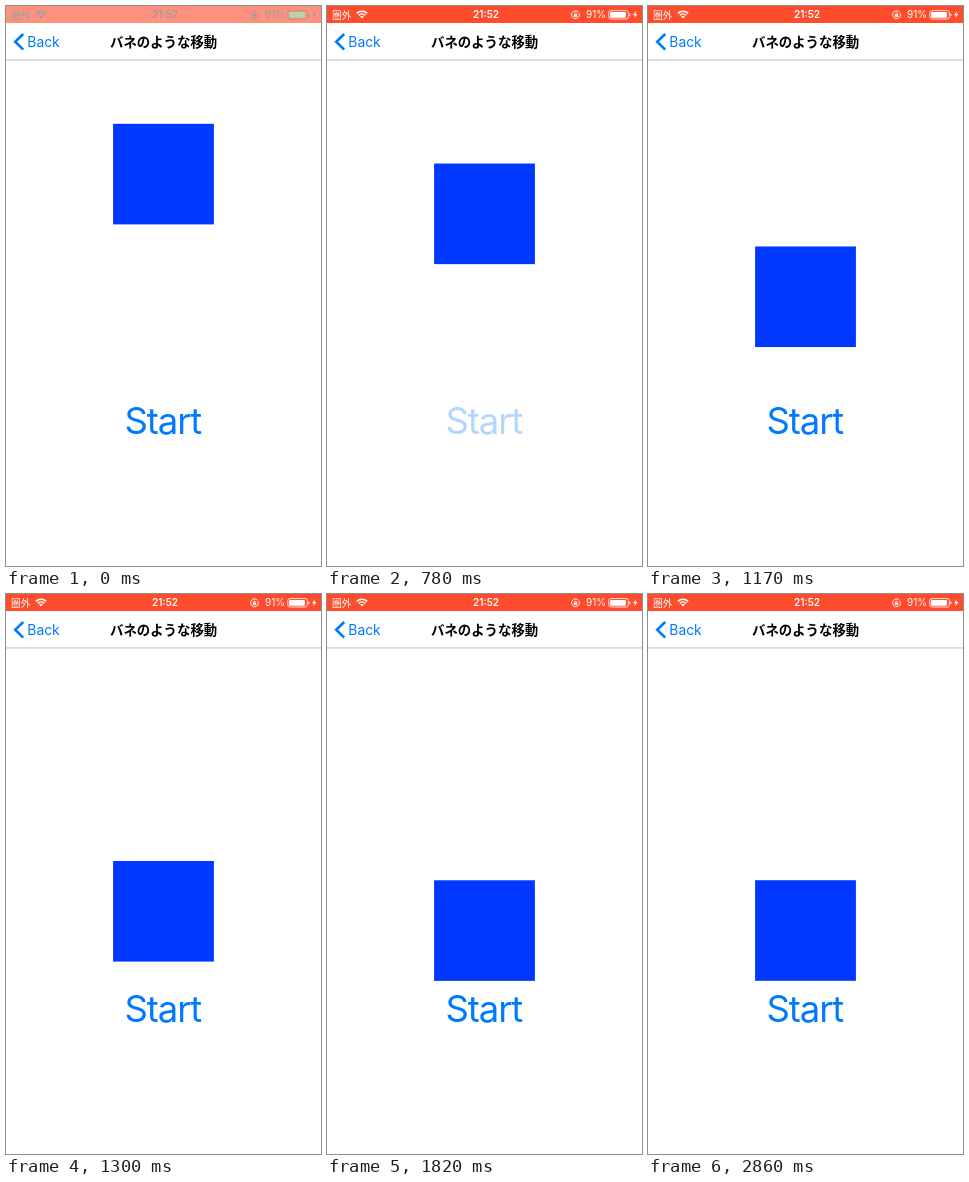
Write an HTML page with a canvas that moves like this. It is 315 px wide and 560 px high and loops after 3.51 s.

```html
<!DOCTYPE html>
<html lang="ja">
<head>
<meta charset="utf-8">
<title>Spring</title>
<style>
html, body { margin: 0; width: 100%; height: 100%; overflow: hidden; background: #fff; }
canvas { display: block; width: 315px; height: 560px; }
</style>
</head>
<body>
<canvas id="stage" width="315" height="560"></canvas>
<script>
const ctx = document.getElementById('stage').getContext('2d');
const LOOP = 3510, STEP = 130, LAST_STEP = 2860;
const LATIN = 'Inter, Roboto, sans-serif';
const CJK = '"Noto Sans CJK JP", "Noto Sans CJK", sans-serif';
const TINT = '#007aff';

const clamp = v => Math.max(0, Math.min(1, v));
const mix = (a, b, k) => 'rgb(' + a.map((v, i) => Math.round(v + (b[i] - v) * k)) + ')';

function text(str, x, y, font, color, align = 'left', spacing = 0) {
  ctx.font = font;
  ctx.letterSpacing = spacing + 'px';
  ctx.fillStyle = color;
  ctx.textAlign = align;
  ctx.fillText(str, x, y);
}

function polyline(points, color, width) {
  ctx.beginPath();
  points.forEach(([x, y]) => ctx.lineTo(x, y));
  ctx.strokeStyle = color;
  ctx.lineWidth = width;
  ctx.stroke();
}

function wifi(x, y, color) {
  const from = -Math.PI * 0.75, to = -Math.PI * 0.25;
  ctx.strokeStyle = ctx.fillStyle = color;
  ctx.lineWidth = 1.6;
  for (const r of [4.6, 7.3]) {
    ctx.beginPath();
    ctx.arc(x, y, r, from, to);
    ctx.stroke();
  }
  ctx.beginPath();
  ctx.moveTo(x, y);
  ctx.arc(x, y, 2.8, from, to);
  ctx.fill();
}

function rotationLock(x, y, color) {
  ctx.strokeStyle = ctx.fillStyle = color;
  ctx.lineWidth = 0.9;
  ctx.beginPath();
  ctx.arc(x, y, 3.9, -0.5, Math.PI * 1.75);
  ctx.stroke();
  ctx.fillRect(x - 1.7, y - 0.4, 3.4, 2.5);
  ctx.beginPath();
  ctx.arc(x, y - 0.5, 1.1, Math.PI, 0);
  ctx.stroke();
}

function battery(x, y, color, fill) {
  ctx.strokeStyle = color;
  ctx.lineWidth = 0.8;
  ctx.beginPath();
  ctx.roundRect(x, y, 19.5, 8.4, 2);
  ctx.stroke();
  ctx.fillStyle = fill;
  ctx.beginPath();
  ctx.roundRect(x + 1.3, y + 1.3, 15.8, 5.8, 0.9);
  ctx.fill();
  ctx.fillStyle = color;
  ctx.fillRect(x + 20.5, y + 2.9, 1, 2.7);
}

function bolt(x, y, color) {
  ctx.fillStyle = color;
  ctx.beginPath();
  [[3, 0], [0, 4.2], [2, 4.2], [1.2, 7.5], [4.4, 3.1], [2.4, 3.1]]
    .forEach(([dx, dy]) => ctx.lineTo(x + dx, y + dy));
  ctx.fill();
}

function statusBar(shown) {
  const ink = mix([0, 0, 0], [255, 255, 255], shown);
  ctx.fillStyle = mix([255, 255, 255], [255, 76, 44], shown);
  ctx.fillRect(0, 0, 315, 17);
  text('圏外', 5, 12.6, '9.7px ' + CJK, ink);
  wifi(35, 12.6, ink);
  text('21:52', 159, 12.4, '600 10px ' + LATIN, ink, 'center');
  rotationLock(248.5, 8.8, ink);
  text('91%', 259, 12.4, '10px ' + LATIN, ink);
  battery(281.8, 4.6, ink, mix([80, 140, 20], [255, 255, 255], shown));
  bolt(306, 5, ink);
}

function navBar() {
  polyline([[17.2, 28], [9.2, 35.8], [17.2, 43.6]], TINT, 2.6);
  text('Back', 21.3, 40.6, '13.9px ' + LATIN, TINT);
  text('バネのような移動', 157.6, 40.6, 'bold 13.4px ' + CJK, '#000', 'center');
  ctx.fillStyle = '#b8b8b8';
  ctx.fillRect(0, 53.5, 315, 0.9);
}

// Underdamped step response, time in seconds
function spring(t) {
  const decay = 2.53, freq = 13.15;
  if (t <= 0) return 0;
  return 1 - Math.exp(-decay * t) *
    (Math.cos(freq * t) + decay / freq * Math.sin(freq * t));
}

function buttonAlpha(ms) {
  if (ms < 650) return 1;
  return 0.2 + 0.8 * clamp((ms - 730) / 390);
}

function draw(now) {
  const ms = Math.min(Math.floor((now % LOOP) / STEP) * STEP, LAST_STEP);
  ctx.fillStyle = '#fff';
  ctx.fillRect(0, 0, 315, 560);

  ctx.fillStyle = '#0038ff';
  ctx.fillRect(107.1, 117.8 + 167.7 * spring((ms - 725) / 1000), 100.8, 100.6);

  ctx.globalAlpha = buttonAlpha(ms);
  text('Start', 156.8, 427.6, '36.5px ' + LATIN, TINT, 'center', -1.1);
  ctx.globalAlpha = 1;

  statusBar(clamp(0.61 + ms / 440));
  navBar();
}

const start = performance.now();
function tick() {
  draw(performance.now() - start);
  requestAnimationFrame(tick);
}
tick();
</script>
</body>
</html>
```
